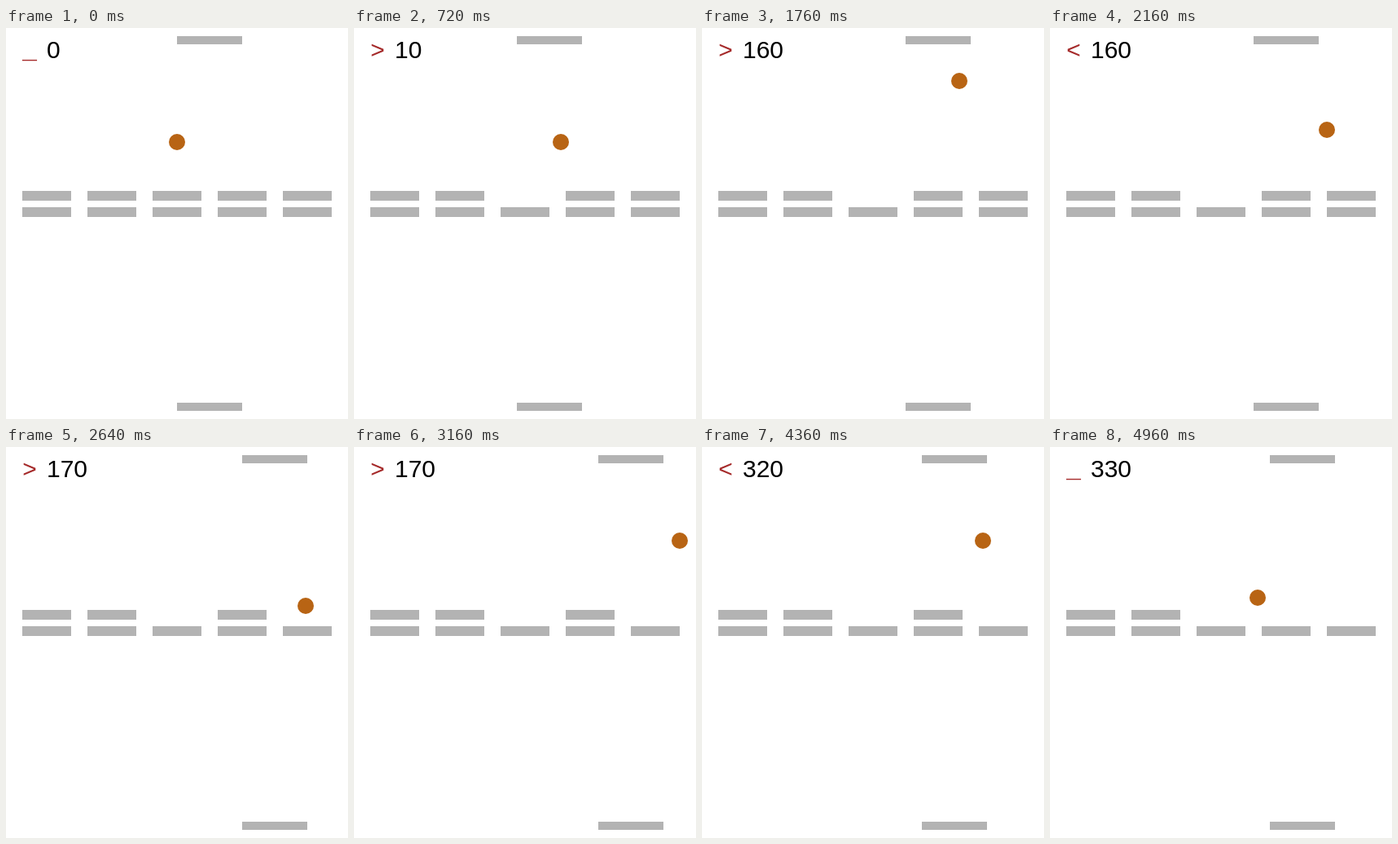
An HTML page with a canvas that plays this animation: 420x480 px, repeating every 5000 ms.

```html
<!DOCTYPE html>
<html lang="en">
<head>
<meta charset="utf-8">
<title>Two-paddle brick game</title>
<style>
  html, body { margin: 0; width: 100%; height: 100%; overflow: hidden; background: #fff; }
  canvas { display: block; }
</style>
</head>
<body>
<canvas id="stage" width="420" height="480"></canvas>
<script>
const ctx = document.getElementById('stage').getContext('2d');
const LOOP = 5000, FRAME = 40, STEPS_PER_FRAME = 1.2, LAST_STEP = 149;
const RADIUS = 10, PADDLE_WIDTH = 80;
const GREY = '#b3b3b3';

// Paddle turning points: [step, x]
const route = [
  [0, 210], [2, 210], [17, 240], [21, 190], [22, 200], [26, 240], [33, 220],
  [38, 240], [40, 230], [42, 220], [50, 240], [61, 270], [65, 250], [67, 240],
  [80, 290], [84, 270], [95, 300], [104, 340], [114, 310], [118, 290],
  [124, 310], [131, 270], [LAST_STEP, 270]
];

function paddleAt(step) {
  const i = Math.max(1, route.findIndex(([s]) => s >= step));
  const [s0, x0] = route[i - 1], [s1, x1] = route[i];
  const x = x0 + (x1 - x0) * (step - s0) / (s1 - s0);
  return { x: Math.round(x / 10) * 10, key: x1 > x0 ? '>' : x1 < x0 ? '<' : '_' };
}

function makeBricks() {
  const bricks = [];
  for (const y of [200, 220])
    for (let x = 20; x < 420; x += 80) bricks.push({ x, y, w: 60, h: 12 });
  return bricks;
}

function simulate() {
  let x = 210, y = 140, vx = 2, vy = 5, score = 0, bricks = makeBricks();
  const states = [{ x, y, score, bricks }];
  for (let step = 1; step <= LAST_STEP; step++) {
    x += vx;
    y += vy;
    if (x > 420 - RADIUS) {
      x = 420 - RADIUS;
      vx = -vx;
    }
    const hit = bricks.find(b => x >= b.x && x <= b.x + b.w &&
      y + RADIUS > b.y && y - RADIUS < b.y + b.h);
    if (hit) {
      bricks = bricks.filter(b => b !== hit);
      vy = -vy;
      score += 10;
    }
    if (vy < 0 && y - RADIUS < 20) {
      vy = -vy;
      score += 150;
      // Hits near the paddle's end leave at a flatter angle.
      if (x - paddleAt(step).x > PADDLE_WIDTH * 0.9 && vx < 0) vx = 5;
    }
    states.push({ x, y, score, bricks });
  }
  return states;
}

const states = simulate();

function bar(x, y, w, h) {
  ctx.fillStyle = GREY;
  ctx.fillRect(x, y, w, h);
}

function label(text, x, y, color, family) {
  ctx.fillStyle = color;
  ctx.font = '30px ' + family;
  ctx.fillText(text, x, y);
}

function draw(now) {
  const step = Math.round(Math.floor(now % LOOP / FRAME) * STEPS_PER_FRAME);
  const { x, y, score, bricks } = states[step];
  const paddle = paddleAt(step);

  ctx.fillStyle = '#fff';
  ctx.fillRect(0, 0, 420, 480);
  for (const b of bricks) bar(b.x, b.y, b.w, b.h);
  bar(paddle.x, 10, PADDLE_WIDTH, 10);
  bar(paddle.x, 460, PADDLE_WIDTH, 10);

  ctx.fillStyle = '#b86414';
  ctx.beginPath();
  ctx.arc(x, y, RADIUS, 0, Math.PI * 2);
  ctx.fill();

  label(paddle.key, 20, 37, '#a52a2a', '"Liberation Mono", monospace');
  label(score, 50, 37, '#000', '"Liberation Sans", Arial, sans-serif');
}

let start;
function tick(now) {
  start ??= now;
  draw(now - start);
  requestAnimationFrame(tick);
}
draw(0);
requestAnimationFrame(tick);
</script>
</body>
</html>
```
